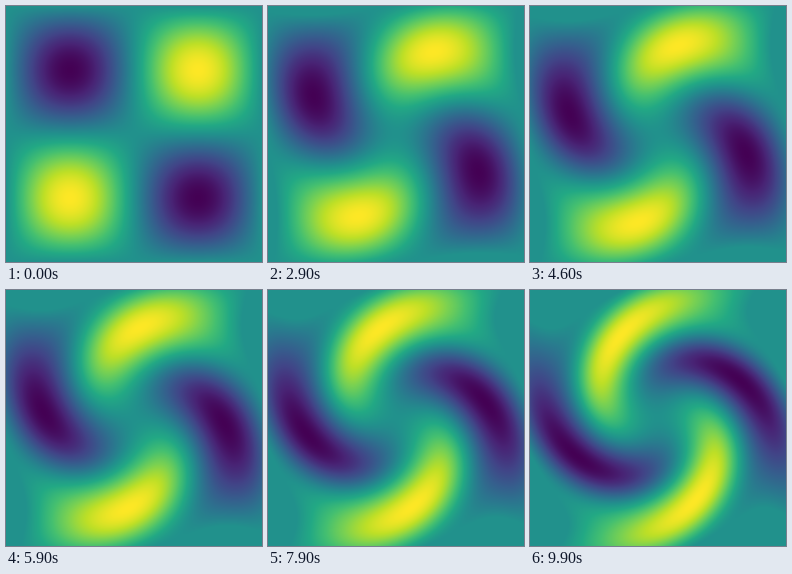
An HTML page with a canvas that plays this animation: 256x256 px, repeating every 10000 ms.

```html
<!DOCTYPE html>
<html lang="en">
<head>
<meta charset="utf-8">
<title>Swirling scalar field</title>
<style>
html, body { margin: 0; width: 100%; height: 100%; overflow: hidden; background: #21918c; }
canvas { display: block; width: 100vw; height: 100vh; }
</style>
</head>
<body>
<canvas id="stage" width="256" height="256"></canvas>
<script>
const SIZE = 256, LOOP = 10000;
const TURN = 2.42 / 9900;   // radians per ms at the vortex centre
const SIGMA = 0.3;          // vortex width, in stage units
const VIRIDIS = ['440154', '482475', '414487', '355f8d', '2a788e', '21918c',
                 '22a884', '44bf70', '7ad151', 'bddf26', 'fde725'];

const ctx = document.getElementById('stage').getContext('2d');
const image = ctx.createImageData(SIZE, SIZE);
const pixels = new Uint32Array(image.data.buffer);

// Colour lookup with 1024 levels, packed as ABGR
const stops = VIRIDIS.map(h => [0, 2, 4].map(i => parseInt(h.slice(i, i + 2), 16)));
const palette = Uint32Array.from({ length: 1024 }, (_, i) => {
  const p = i / 1023 * (stops.length - 1);
  const k = Math.min(Math.floor(p), stops.length - 2);
  const [r, g, b] = stops[k].map((c, j) => Math.round(c + (stops[k + 1][j] - c) * (p - k)));
  return (255 << 24 | b << 16 | g << 8 | r) >>> 0;
});

// The picture advances every 200 ms, with a few shorter steps
const SHORT = new Set([2800, 4500, 5000, 5300, 5600]);
const times = [];
for (let t = 0; t < LOOP; t += SHORT.has(t) ? 100 : 200) times.push(t);

// Angular speed falls off as a Gaussian of the radius
const falloff = new Float64Array(SIZE * SIZE);
const coord = i => (i + 0.5) / SIZE - 0.5;
for (let y = 0, n = 0; y < SIZE; y++) {
  for (let x = 0; x < SIZE; x++, n++) {
    const r2 = coord(x) ** 2 + coord(y) ** 2;
    falloff[n] = Math.exp(-r2 / (2 * SIGMA * SIGMA));
  }
}

// Starting field: four alternating blobs, zero outside the square
function field(u, v) {
  if (Math.abs(u) > 0.5 || Math.abs(v) > 0.5) return 0;
  return -Math.sin(2 * Math.PI * u) * Math.sin(2 * Math.PI * v);
}

function draw(t) {
  for (let y = 0, n = 0; y < SIZE; y++) {
    const v = coord(y);
    for (let x = 0; x < SIZE; x++, n++) {
      const u = coord(x);
      const a = TURN * t * falloff[n];
      const c = Math.cos(a), s = Math.sin(a);
      const value = field(u * c - v * s, u * s + v * c);
      pixels[n] = palette[Math.round((value + 1) / 2 * 1023)];
    }
  }
  ctx.putImageData(image, 0, 0);
}

let shown = 0;
draw(0);

const start = performance.now();
function tick() {
  const now = (performance.now() - start) % LOOP;
  const t = times.findLast(s => s <= now);
  if (t !== shown) draw(shown = t);
  requestAnimationFrame(tick);
}
requestAnimationFrame(tick);
</script>
</body>
</html>
```
